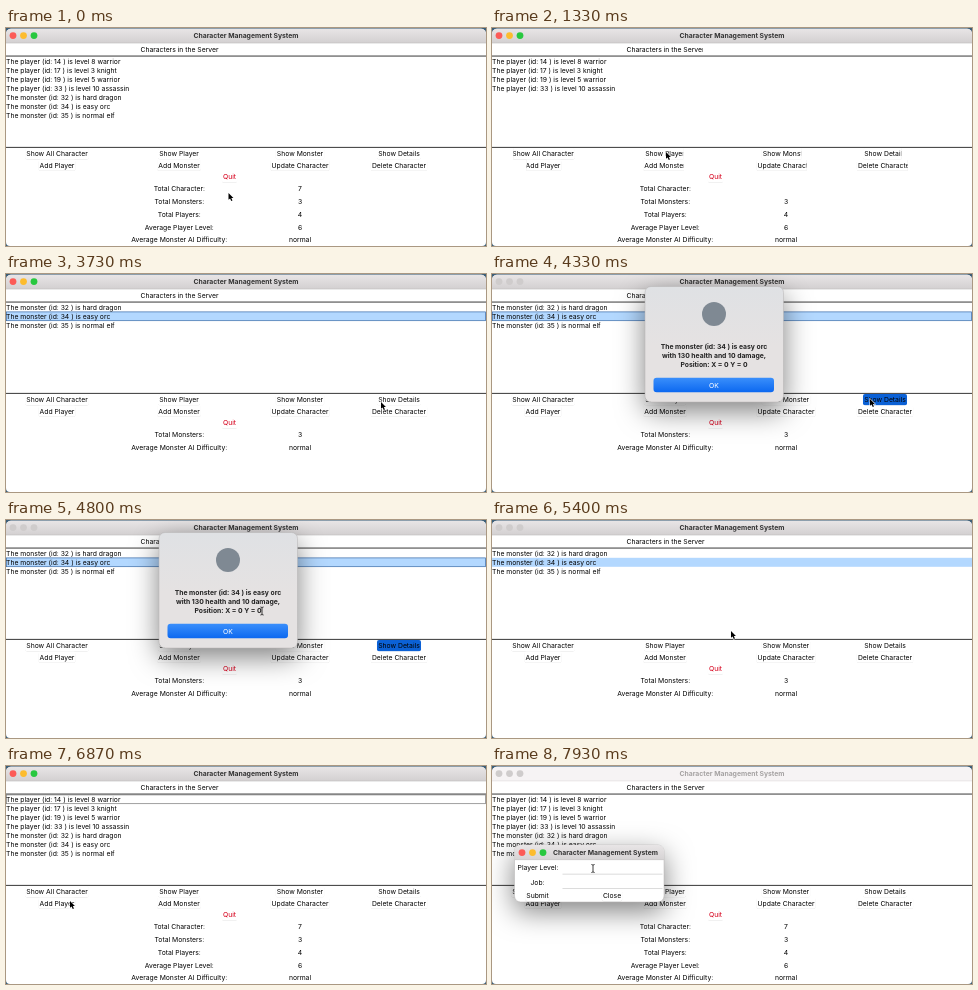
Animation, 480 px wide and 218 px high, one loop 8000 ms. Source, as an HTML page with a canvas:

```html
<!DOCTYPE html>
<html lang="en">
<head>
<meta charset="utf-8">
<title>Character Management System</title>
<style>
  html, body { margin: 0; width: 100%; height: 100%; overflow: hidden; background: #fff; }
  canvas { display: block; width: 480px; height: 218px; }
</style>
</head>
<body>
<canvas id="stage"></canvas>
<script>
const W = 480, H = 218, LOOP = 8000;
const canvas = document.getElementById('stage');
const ratio = window.devicePixelRatio || 1;
canvas.width = W * ratio;
canvas.height = H * ratio;
const ctx = canvas.getContext('2d');

const REGULAR = '6.8px Inter, sans-serif';
const BOLD = 'bold 6.8px Inter, sans-serif';
const APP_TITLE = 'Character Management System';
const PRESS_BLUE = '#0b61d6';

const players = ['14 ) is level 8 warrior', '17 ) is level 3 knight',
  '19 ) is level 5 warrior', '33 ) is level 10 assassin'].map(s => `The player (id: ${s}`);
const monsters = ['32 ) is hard dragon', '34 ) is easy orc',
  '35 ) is normal elf'].map(s => `The monster (id: ${s}`);

const wide = { columns: [51, 173, 294, 393], quit: 223.5 };
const narrow = { columns: [53, 170.3, 285, 387.5], quit: 221.5 };

const views = {
  all: {
    layout: wide, rows: [...players, ...monsters],
    stats: [['Total Character:', '7'], ['Total Monsters:', '3'], ['Total Players:', '4'],
      ['Average Player Level:', '6'], ['Average Monster AI Difficulty:', 'normal']]
  },
  players: {
    layout: narrow, rows: players,
    stats: [['Total Players:', '4'], ['Average Player Level:', '6']]
  },
  monsters: {
    layout: wide, rows: monsters,
    stats: [['Total Monsters:', '3'], ['Average Monster AI Difficulty:', 'normal']]
  }
};

const buttonRows = [
  { y: 125.5, labels: ['Show All Character', 'Show Player', 'Show Monster', 'Show Details'] },
  { y: 137, labels: ['Add Player', 'Add Monster', 'Update Character', 'Delete Character'] }
];

const presses = [
  ['Show Player', 1130, 1330], ['Show Monster', 2130, 2400], ['Show Details', 3930, 5330],
  ['Show All Character', 6130, 6330], ['Add Player', 7000, 7130]
];

// Pointer path: time, x, y
const path = [
  [0, 222.5, 165], [270, 222.5, 165], [470, 169, 133], [600, 169, 133], [930, 174, 124],
  [1530, 174, 124], [1870, 277, 124], [2600, 277, 124], [2970, 140, 41], [3130, 140, 41],
  [3730, 375, 128], [3930, 378, 125], [4330, 378, 125], [4800, 256, 91], [5070, 239, 111],
  [5400, 239, 111], [6000, 50, 124], [6400, 50, 124], [6800, 64, 135], [7470, 64, 135],
  [7600, 58, 129], [7930, 101, 102.5]
];

const within = (t, from, to) => t >= from && t < to;

function pointerAt(t) {
  const i = path.findIndex(p => p[0] > t);
  if (i < 0) return path[path.length - 1].slice(1);
  const [t0, x0, y0] = path[i - 1], [t1, x1, y1] = path[i];
  const u = (t - t0) / (t1 - t0), e = u * u * (3 - 2 * u);
  return [x0 + (x1 - x0) * e, y0 + (y1 - y0) * e];
}

function text(str, x, y, { align = 'center', color = '#000', font = REGULAR } = {}) {
  ctx.font = font;
  ctx.textAlign = align;
  ctx.fillStyle = color;
  ctx.fillText(str, x, y + 2.5);
}

function textWidth(str) {
  ctx.font = REGULAR;
  return ctx.measureText(str).width;
}

function rect(x, y, w, h, color) {
  ctx.fillStyle = color;
  ctx.fillRect(x, y, w, h);
}

function roundBox(x, y, w, h, r, color) {
  ctx.beginPath();
  ctx.roundRect(x, y, w, h, r);
  ctx.fillStyle = color;
  ctx.fill();
}

function disc(x, y, r, color) {
  ctx.beginPath();
  ctx.arc(x, y, r, 0, Math.PI * 2);
  ctx.fillStyle = color;
  ctx.fill();
}

function shade(y, h, top, bottom) {
  const gradient = ctx.createLinearGradient(0, y, 0, y + h);
  gradient.addColorStop(0, top);
  gradient.addColorStop(1, bottom);
  return gradient;
}

function lights(x, y, active) {
  ['#fc5b57', '#fdbc2e', '#28c83f'].forEach((color, i) =>
    disc(x + i * 10.5, y, 3.4, active ? color : '#cfcccc'));
}

function titleBar(active, faded) {
  const fill = faded ? '#f6f3f4' : shade(0.7, 14, '#e8e5e6', '#d3d0d1');
  roundBox(0, 0.7, W, 14.6, [5, 5, 0, 0], fill);
  rect(0, 14.6, W, 0.6, faded ? '#dedbdb' : '#c4c1c1');
  lights(7, 7.6, active);
  text(APP_TITLE, 240, 7.7, { font: BOLD, color: faded ? '#a5a2a2' : '#333' });
}

// Draws at x, showing only what falls inside the same item's box around clipX.
function clipped(label, x, y, clipX, draw) {
  const half = textWidth(label) / 2 + 1;
  ctx.save();
  if (clipX !== x) {
    ctx.beginPath();
    ctx.rect(clipX - half, y - 7, half * 2, 14);
    ctx.clip();
  }
  draw(half);
  ctx.restore();
}

function button(label, x, y, clipX, pressed, color = '#000') {
  clipped(label, x, y, clipX, half => {
    const left = x - half, w = half * 2;
    roundBox(left, y - 5, w, 11.1, 2, '#d9d9d9');
    roundBox(left - 0.2, y - 5.6, w + 0.4, 11.3, 2, pressed ? PRESS_BLUE : '#fff');
    text(label, x, y, { color });
  });
}

function list(rows, selected, ring) {
  if (selected >= 0) rect(0, 37.8, W, 9, '#b3d8ff');
  if (ring >= 0) {
    ctx.strokeStyle = selected >= 0 ? '#3e6da8' : '#777';
    ctx.lineWidth = 0.7;
    ctx.strokeRect(0.4, 28.9 + ring * 9, W - 0.8, 8.8);
  }
  rows.forEach((row, i) => text(row, 0, 33.4 + i * 9, { align: 'left' }));
}

function windowBody(view, next, t) {
  const { columns, quit } = view.layout;
  const target = next.layout;
  const shifting = view !== next;
  const header = 'Characters in the Server';
  clipped(header, columns[1] + 0.5, 21.5, target.columns[1] + 0.5,
    () => text(header, columns[1] + 0.5, 21.5));
  rect(0, 27.6, W, 0.9, '#222');
  rect(0, 118.9, W, 0.9, '#222');

  const selected = within(t, 3000, 6330) ? 1 : -1;
  const unfocused = within(t, 5330, 5470) || t >= 7270;
  const ring = unfocused ? -1 : selected >= 0 ? selected : t >= 6330 ? 0 : -1;
  list(next.rows, selected, ring);

  const pressed = presses.find(([, from, to]) => within(t, from, to));
  for (const { y, labels } of buttonRows)
    labels.forEach((label, i) =>
      button(label, columns[i], y, target.columns[i], pressed && pressed[0] === label));
  button('Quit', quit, 148.7, quit, false, '#d6001c');

  view.stats.forEach(([label, value], i) => {
    const y = 160.6 + i * 12.8;
    text(label, columns[1] + 0.3, y);
    if (!shifting || i) text(value, columns[2], y);
  });
}

function panel(x, y, w, h, color) {
  ctx.save();
  ctx.shadowColor = 'rgba(0,0,0,.5)';
  ctx.shadowBlur = 28 * ratio;
  ctx.shadowOffsetY = 9 * ratio;
  roundBox(x, y, w, h, 6, color);
  ctx.restore();
  ctx.beginPath();
  ctx.roundRect(x, y, w, h, 6);
  ctx.strokeStyle = '#b5b2b2';
  ctx.lineWidth = 0.5;
  ctx.stroke();
}

function detailsDialog(alpha) {
  ctx.save();
  ctx.globalAlpha = alpha;
  panel(153, 12.5, 138.5, 115.5, shade(12, 60, '#dfe1e4', '#e5e2e2'));
  disc(222, 40, 12, '#7f8993');
  ['The monster (id: 34 ) is easy orc', 'with 130 health and 10 damage,', 'Position: X = 0 Y = 0']
    .forEach((line, i) => text(line, 222, 72.3 + i * 9.1, { font: BOLD, color: '#222' }));
  roundBox(161.5, 103.7, 120.5, 14.6, 3.2, shade(103.7, 14.6, '#3a8ffb', '#0c68f0'));
  text('OK', 222, 111, { color: '#fff' });
  ctx.restore();
}

function playerDialog(alpha) {
  ctx.save();
  ctx.globalAlpha = alpha;
  panel(22.5, 79, 149.5, 57, '#fff');
  roundBox(22.5, 79, 149.5, 15, [6, 6, 0, 0], shade(79, 15, '#e8e5e6', '#d6d3d4'));
  rect(22.5, 93.6, 149.5, 0.5, '#c4c1c1');
  lights(30, 86.6, true);
  text(APP_TITLE, 113.5, 86.6, { font: BOLD, color: '#333' });
  text('Player Level:', 46, 101);
  text('Job:', 45.5, 116);
  for (const y of [107.8, 122.3]) rect(70.5, y, 100, 0.6, '#c4c4c4');
  button('Submit', 45.5, 129.3, 45.5, false);
  button('Close', 120, 129.3, 120, false);
  ctx.restore();
}

function arrow(x, y) {
  ctx.save();
  ctx.translate(x, y);
  ctx.scale(0.88, 0.88);
  const shape = new Path2D('M0 0V7.8L1.8 6.2L3.1 9.1L4.5 8.5L3.2 5.7H5.6Z');
  ctx.strokeStyle = '#fff';
  ctx.lineWidth = 1.2;
  ctx.stroke(shape);
  ctx.fillStyle = '#000';
  ctx.fill(shape);
  ctx.restore();
}

function beam(x, y) {
  ctx.strokeStyle = '#111';
  ctx.lineWidth = 0.8;
  ctx.stroke(new Path2D(
    `M${x - 1.6} ${y - 4}Q${x} ${y - 4} ${x} ${y - 3}V${y + 3}Q${x} ${y + 4} ${x - 1.6} ${y + 4}` +
    `M${x + 1.6} ${y - 4}Q${x} ${y - 4} ${x} ${y - 3}M${x} ${y + 3}Q${x} ${y + 4} ${x + 1.6} ${y + 4}`));
}

function viewsAt(t) {
  const { all, players, monsters } = views;
  if (t < 1330 || t >= 6330) return [all, all];
  if (t < 1400) return [all, players];
  if (t < 2400) return [players, players];
  if (t < 2470) return [players, monsters];
  return [monsters, monsters];
}

function draw(t) {
  ctx.setTransform(ratio, 0, 0, ratio, 0, 0);
  rect(0, 0, W, H, '#3d5f78');
  roundBox(0, 0.7, W, H - 0.7, [5, 5, 4, 4], '#fff');
  const formOpen = t >= 7270;
  titleBar(!within(t, 4200, 5470) && !formOpen, formOpen);
  windowBody(...viewsAt(t), t);

  if (within(t, 4200, 5330)) detailsDialog(t < 4270 || t >= 5200 ? 0.55 : 1);
  if (formOpen) playerDialog(t < 7330 ? 0.6 : 1);

  const [x, y] = pointerAt(t);
  const overText = within(t, 4730, 4930) || t >= 7800;
  (overText ? beam : arrow)(x, y);
}

function tick() {
  const step = Math.floor((performance.now() % LOOP + 4) * 0.015) % 120;
  draw(Math.round(step * 100 / 15) * 10);
  requestAnimationFrame(tick);
}
tick();
</script>
</body>
</html>
```
